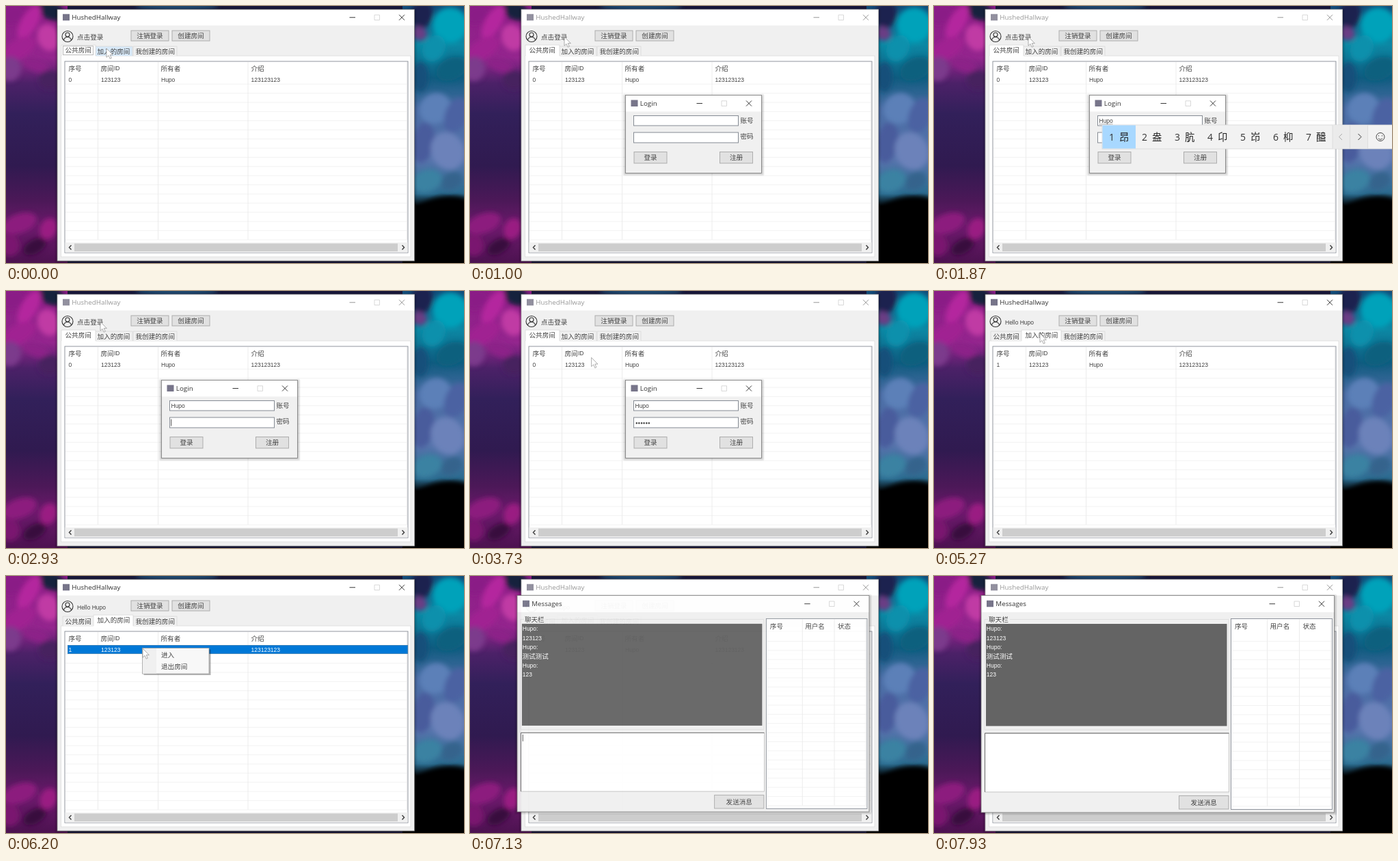
Write an HTML page that moves like this. It is 670 px wide and 376 px high and loops after 8 s.

```html
<!DOCTYPE html>
<html lang="zh">
<head>
<meta charset="utf-8">
<title>Chat rooms</title>
<style>
  html, body { margin: 0; width: 100%; height: 100%; overflow: hidden; background: #000; }
  svg { display: block; width: 670px; height: 376px; }
  text { font-family: "Liberation Sans", "Noto Sans CJK SC", "Noto Sans CJK", sans-serif; white-space: pre; }
  .caption { font-family: "Open Sans", "Noto Sans", sans-serif; }
</style>
</head>
<body>
<svg viewBox="0 0 670 376">
  <defs>
    <filter id="soft" x="-10%" y="-10%" width="120%" height="120%"><feGaussianBlur stdDeviation="3.5"/></filter>
    <linearGradient id="magenta" x2="0" y2="1">
      <stop offset="0" stop-color="#8c1c86"/><stop offset=".2" stop-color="#94268e"/>
      <stop offset=".3" stop-color="#4c2168"/><stop offset=".42" stop-color="#32205a"/>
      <stop offset=".62" stop-color="#301a50"/><stop offset=".76" stop-color="#4c1858"/>
      <stop offset=".86" stop-color="#6c1a6c"/><stop offset="1" stop-color="#4c1250"/>
    </linearGradient>
    <linearGradient id="teal" x2="0" y2="1">
      <stop offset="0" stop-color="#124a78"/><stop offset=".15" stop-color="#0c88a4"/>
      <stop offset=".28" stop-color="#105c80"/><stop offset=".4" stop-color="#4a6ca4"/>
      <stop offset=".6" stop-color="#5674ac"/><stop offset=".73" stop-color="#2c6c90"/><stop offset=".78" stop-color="#000"/>
    </linearGradient>
  </defs>
  <rect width="670" height="376" fill="#171638"/>
  <rect width="90" height="376" fill="url(#magenta)"/>
  <rect x="580" width="90" height="376" fill="url(#teal)"/>
  <g id="smoke" filter="url(#soft)"></g>
  <g id="ui"></g>
</svg>
<script>
const LOOP = 8000;
const APP = 'HushedHallway', USER = 'Hupo';

// Coloured smoke: x, y, rx, ry, rotation, colour
const blobs = [
  [250, 0, 60, 7, 0, '#1f4a70'], [66, 6, 20, 14, 30, '#16223e'], [10, 12, 18, 14, -20, '#8a1c86'],
  [34, 24, 12, 28, 30, '#b4289e'], [62, 46, 16, 20, -20, '#c03aa4'], [20, 62, 26, 14, -30, '#a02092'],
  [6, 92, 16, 18, 10, '#7c3a8c'], [44, 86, 20, 10, 20, '#8c2488'], [64, 108, 16, 14, 0, '#46205e'],
  [20, 318, 26, 14, -20, '#8c1a7e'], [62, 326, 12, 16, 20, '#9a1c82'], [6, 350, 14, 16, 0, '#7a1670'],
  [42, 352, 18, 10, -30, '#38103e'],
  [608, 12, 16, 22, 10, '#1a2450'], [604, 40, 12, 10, 20, '#6a3c84'], [650, 28, 26, 26, -20, '#06a2ba'],
  [626, 62, 16, 20, 30, '#0a90ac'], [652, 92, 24, 16, -25, '#0c607e'], [606, 104, 12, 22, 0, '#12507a'],
  [628, 150, 24, 22, -35, '#5c80b8'], [658, 160, 16, 26, 20, '#4c62a2'], [610, 200, 16, 30, 10, '#4a5c9c'],
  [646, 212, 24, 28, -25, '#6c82ba'], [616, 256, 22, 16, -20, '#3a82a2'], [652, 256, 16, 12, -30, '#34648c'],
  [640, 325, 62, 46, -16, '#000']
];
document.getElementById('smoke').innerHTML = blobs.map(([x, y, rx, ry, angle, fill]) =>
  `<ellipse cx="${x}" cy="${y}" rx="${rx}" ry="${ry}" fill="${fill}" transform="rotate(${angle} ${x} ${y})"/>`).join('');

const clamp = v => Math.max(0, Math.min(1, v));
const progress = (t, from, to) => clamp((t - from) / (to - from));
const easeOut = p => 1 - (1 - p) ** 3;
const smooth = p => p * p * (3 - 2 * p);

const INK = '#424242';
const rect = (x, y, w, h, fill, stroke = 'none', extra = '') =>
  `<rect x="${x}" y="${y}" width="${w}" height="${h}" fill="${fill}" stroke="${stroke}" ${extra}/>`;
const path = (d, stroke, fill = 'none', width = 1, extra = '') =>
  `<path d="${d}" stroke="${stroke}" fill="${fill}" stroke-width="${width}" ${extra}/>`;
// Text is placed by its left edge and vertical centre.
const text = (x, y, s, size, fill = INK, extra = '') =>
  `<text x="${x}" y="${y + size * 0.36}" font-size="${size}" fill="${fill}" ${extra}>${s}</text>`;
const cjk = (x, y, s, fill, extra) => text(x, y, s, 9.6, fill, extra);
const latin = (x, y, s, fill) => text(x, y, s, 8.5, fill);
const button = (x, y, w, h, label) => rect(x, y, w, h, '#e1e1e1', '#adadad') +
  cjk(x + (w - 9.6 * label.length) / 2, y + h / 2, label);
const caret = (x, y) => path(`M${x} ${y}v10`, '#222', 'none', 0.8);

function windowFrame(x, y, w, h, title, active, barHeight) {
  const ink = active ? '#222' : '#8d8d8d';
  const mid = y + barHeight / 2;
  const right = x + w;
  let out = '';
  for (let i = 4; i; i--) out += rect(x - i, y - i + 2, w + 2 * i, h + 2 * i - 2, 'rgba(0,0,0,.06)', 'none', 'rx="2"');
  return out + rect(x, y, w, h, '#f0f0f0') + rect(x, y, w, barHeight, '#fff') +
    rect(x, y, w, h, 'none', active ? '#777' : '#aaa', 'stroke-width=".8"') +
    rect(x + 8, mid - 5, 10, 9.5, active ? '#77758a' : '#92909f') +
    text(x + 21.3, mid - 0.3, title, 9.8, active ? '#333' : '#999', 'class="caption"') +
    path(`M${right - 95} ${mid}h8.5`, ink, 'none', 0.9) +
    path(`M${right - 58.5} ${mid - 3.7}h7.5v7.5h-7.5z`, '#cfcfcf', 'none', 0.8) +
    path(`M${right - 22.5} ${mid - 4}l8 8m0 -8l-8 8`, ink, 'none', 0.9);
}

function grid(x, y, w, h, columns, rows) {
  let d = '';
  for (let i = 0; i < rows; i++) d += `M${x + 1} ${y + 33.2 + i * 13.4}h${w - 2}`;
  return rect(x, y, w, h, '#fff', '#858b94', 'stroke-width=".9"') + path(d, '#f1f1f1', 'none', 0.9) +
    path(columns.map(c => `M${c} ${y + 1}V${y + 33 + rows * 13.4 - 13.4}`).join(''), '#eaeaea', 'none', 0.9);
}

function tabs(selected, focused, hovered) {
  const items = [[83, 47, '公共房间'], [130, 55, '加入的房间'], [186, 64, '我创建的房间']];
  const draw = ([x, w, label], i) => {
    const on = i === selected;
    return rect(on ? x - 2 : x, on ? 57 : 59, on ? w + 3 : w, on ? 17 : 14,
      on ? '#fff' : i === hovered ? '#d8e9f8' : '#f0f0f0', 'none') +
      path(`M${on ? x - 2 : x} 73V${on ? 57 : 59}h${on ? w + 3 : w}V73`, '#d9d9d9', 'none', 0.8) +
      cjk(x + 3.5, on ? 65 : 66.3, label);
  };
  const order = [0, 1, 2].sort((a, b) => (a === selected) - (b === selected));
  return rect(80.5, 73, 511.5, 294, '#fff', '#dcdcdc', 'stroke-width=".8"') +
    order.map(i => draw(items[i], i)).join('') +
    (focused ? rect(83.5, 58.5, 44, 13, 'none', '#555', 'stroke-dasharray="1 1" stroke-width=".8"') : '');
}

function mainWindow(t, cursor) {
  const active = t < 720 || (t >= 4330 && t < 6950);
  const joined = t >= 5250;
  const picked = t >= 5950 && t < 6950;
  const hovered = !joined && cursor.y > 57 && cursor.y < 73 && cursor.x > 130 && cursor.x < 185 ? 1 : -1;
  const ink = picked ? '#fff' : INK;
  let out = windowFrame(75, 5, 522.5, 368, APP, active, 23.5);
  out += `<g fill="none" stroke="#333" stroke-width="1.1"><circle cx="90" cy="44.5" r="8"/><circle cx="90" cy="42" r="3"/><path d="M84.5 50q1-4.5 5.5-4.5t5.5 4.5"/></g>`;
  out += t < 4700 ? cjk(104, 45.5, '点击登录') : latin(104, 45.5, 'Hello ' + USER);
  out += button(183, 36, 55, 15, '注销登录') + button(243, 36, 55, 15, '创建房间');
  out += tabs(joined ? 1 : 0, t < 780, hovered);
  out += grid(86, 81, 502, 280, [134.5, 222.5, 354, 586.5], 18);
  out += cjk(91.5, 91.2, '序号') + cjk(138.5, 91.2, '房间') + latin(158, 91.2, 'ID') +
    cjk(226.5, 91.2, '所有者') + cjk(358.5, 91.2, '介绍');
  if (picked) out += rect(90, 101, 498, 13, '#0078d7') +
    rect(90.5, 101.5, 497, 12, 'none', '#e0a060', 'stroke-width=".5" stroke-dasharray="1 1"');
  out += latin(91.5, 107.7, joined ? '1' : '0', ink) + latin(139, 107.7, '123123', ink) +
    latin(227, 107.7, USER, ink) + latin(358.5, 107.7, '123123123', ink);
  out += rect(86.5, 346, 501, 14.5, '#f0f0f0') + rect(100, 347.5, 473, 11.5, '#cdcdcd') +
    path('M95.5 350l-3 3.2 3 3.2M579.5 350l3 3.2-3 3.2', '#444', 'none', 1.5);
  return out;
}

function loginDialog(t) {
  const typed = Math.floor(clamp((t - 1150) / 600) * USER.length);
  const name = USER.slice(0, typed);
  const dots = Math.floor(progress(t, 3000, 3450) * 6);
  const inPassword = t >= 2600;
  const composing = typed > 1 && t < 2300;
  const blink = t % 1060 < 530 || (t > 2600 && t < 3500);
  let out = windowFrame(227.5, 130.5, 199, 114, 'Login', t < 4330, 24);
  out += rect(239.5, 160.5, 153, 14.5, '#fff', '#858b94') + rect(239.5, 185, 153, 15, '#fff', '#858b94');
  out += latin(241.5, 167.5, name) + cjk(395.5, 167.5, '账号') + cjk(395.5, 190.5, '密码');
  if (composing) out += path(`M242 172.8h${typed * 4.7}`, '#333', 'none', 0.8, 'stroke-dasharray="1 1"');
  out += text(242, 192.5, '●'.repeat(dots), 6);
  if (blink && !composing) out += inPassword ? caret(241.7 + dots * 6, 187.5) : caret(241.7 + typed * 4.7, 162.5);
  return out + button(240, 213.5, 48, 16.5, '登录') + button(365.5, 213.5, 48, 16.5, '注册');
}

function candidateBar() {
  let out = rect(246, 174, 430, 35, '#f2f2f2', '#d4d4d4', 'stroke-width=".8"') + rect(246.5, 174.5, 48.5, 34, '#a8d8ff');
  [...'昂盎肮卬岇枊醠'].forEach((glyph, i) => {
    const x = 256 + i * 48;
    out += text(x, 191.5, i + 1, 14, '#333', 'class="caption"') + text(x + 15, 191.5, glyph, 14.4, '#222');
  });
  return out + rect(583, 174.5, 51, 34, '#ebebeb') + path('M583 174.5v34M608.5 174.5v34M634.5 174.5v34', '#d8d8d8', 'none', 0.8) +
    path('M597 187l-4.5 4.5 4.5 4.5', '#aaa') + path('M620.5 187l4.5 4.5-4.5 4.5', '#333') +
    '<circle cx="653" cy="191.5" r="6" fill="none" stroke="#444"/>' +
    path('M650 193.5q3 3.5 6 0M650.5 189.2v1.3M655.5 189.2v1.3', '#444');
}

function contextMenu(cursor) {
  return rect(201.5, 107.5, 98, 37.5, 'rgba(0,0,0,.3)') + rect(199.5, 105.5, 97.5, 37.5, '#f8f8f8', '#a0a0a0', 'stroke-width=".8"') +
    rect(200, 106, 20, 36.5, '#f0f0f0') +
    (cursor.x > 212 ? rect(201.5, 107, 94, 17, '#b3d7f3', '#0078d7', 'stroke-width=".6"') : '') +
    cjk(227, 115.3, '进入') + cjk(227, 132.5, '退出房间');
}

function messagesWindow(t) {
  let out = windowFrame(69, 28.5, 516.5, 317.5, 'Messages', true, 24.5);
  out += path('M79 63.5h-5V225h357V63.5H111', '#dcdcdc', 'none', 0.8) + cjk(80, 63.5, '聊天栏');
  out += rect(76, 70, 352.5, 149.5, '#646464');
  const log = [USER + ':', '123123', USER + ':', '测试测试', USER + ':', '123'];
  log.forEach((line, i) => {
    const y = 77.3 + i * 13.4;
    out += i === 3 ? cjk(76.5, y, line, '#fff', 'font-weight="500"') : latin(76.8, y, line, '#fff');
  });
  out += rect(74.5, 230, 357, 86, '#fff', '#b8b8b8', 'stroke-width=".8"') + path('M74.5 316V230H431.5', '#6a6a6a');
  if (t < 7600) out += caret(77.3, 232.5);
  out += button(358.5, 321.5, 72.5, 19.5, '发送消息') + grid(434.5, 62.5, 148, 279, [487.5, 534.5, 580.5], 19);
  return out + cjk(440, 73.5, '序号') + cjk(491.5, 73.5, '用户名') + cjk(539.5, 73.5, '状态');
}

// Opening and closing windows fade while scaling about a point.
const zoom = (content, x, y, scale, opacity) =>
  `<g opacity="${opacity}" transform="translate(${x} ${y}) scale(${scale}) translate(${-x} ${-y})">${content}</g>`;

const route = [
  [0, 147, 62], [200, 147, 62], [650, 138, 45], [3500, 138, 45], [4150, 275, 226], [4650, 275, 226],
  [5100, 155, 62], [5400, 155, 62], [5850, 200, 106], [6350, 200, 106], [6700, 235, 113], [LOOP, 235, 113]
];
function cursorAt(t) {
  const i = route.findIndex(stop => stop[0] > t);
  const [from, x0, y0] = route[i - 1], [to, x1, y1] = route[i];
  const p = smooth(progress(t, from, to));
  return { x: x0 + (x1 - x0) * p, y: y0 + (y1 - y0) * p };
}
const pointer = ({ x, y }) => `<g transform="translate(${x} ${y})">` +
  path('M0 0V13.2L3 10.4 5.2 15.2 7.3 14.2 5.2 9.6H9.3Z', '#999', '#fff', 0.8) + '</g>';

const ui = document.getElementById('ui');
function render(t) {
  const cursor = cursorAt(t);
  let out = mainWindow(t, cursor);
  if (t >= 720 && t < 4500) {
    const shown = easeOut(progress(t, 720, 920)) * (1 - easeOut(progress(t, 4330, 4500)) * 0.97);
    out += zoom(loginDialog(t), 327, 187.5, 0.95 + 0.05 * shown, shown);
  }
  if (t >= 1450 && t < 2300) out += candidateBar();
  if (t >= 6020 && t < 6870) out += contextMenu(cursor);
  if (t >= 6950) {
    const shown = easeOut(progress(t, 6950, 7230));
    out += zoom(messagesWindow(t), 69, 28.5, 0.93 + 0.07 * shown, shown);
  } else out += pointer(cursor);
  ui.innerHTML = out;
}

const start = performance.now();
function tick() {
  render((performance.now() - start) % LOOP);
  requestAnimationFrame(tick);
}
tick();
</script>
</body>
</html>
```
